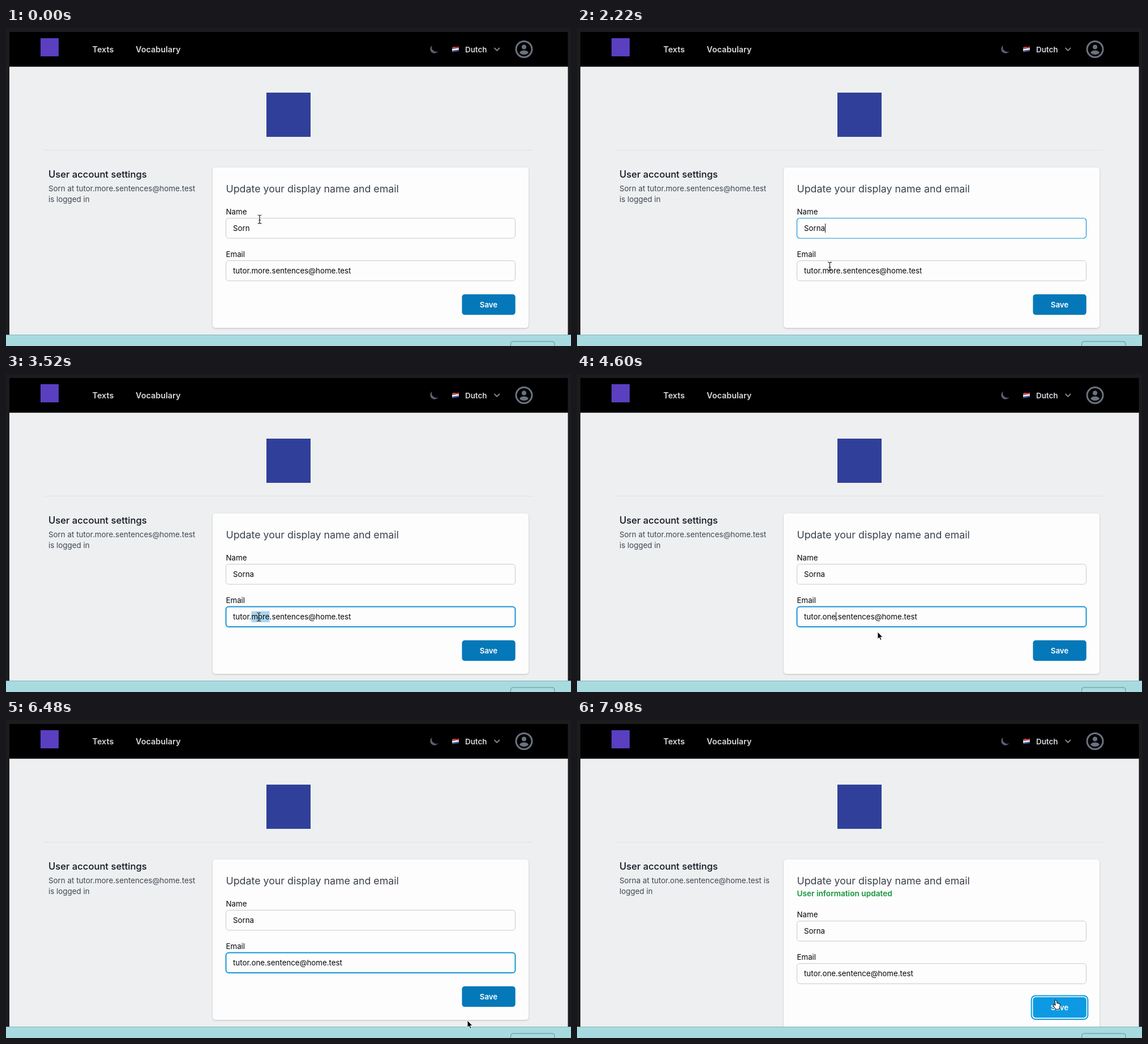
Write an HTML page that moves like this. It is 998 px wide and 561 px high and loops after 8000 ms.

```html
<!DOCTYPE html>
<html lang="en">
<head>
<meta charset="utf-8">
<title>Account settings</title>
<style>
  html, body { margin: 0; width: 100%; height: 100%; overflow: hidden; background: #edeff0; }
  svg { display: block; width: 998px; height: 561px; }
  text { font: 400 13.3px Inter, "Open Sans", sans-serif; fill: #06080c; white-space: pre; }
  .nav { font-size: 14.4px; font-weight: 600; fill: #d6d9de; }
  .lang { font-size: 13.4px; font-weight: 600; fill: #d6d9de; }
  .title { font-size: 16.6px; font-weight: 500; fill: #10151f; }
  .head { font-size: 17.8px; fill: #3a414c; }
  .para { font-size: 13.4px; fill: #3f4752; }
  .done { font-size: 13.65px; font-weight: 600; fill: #15963a; }
  .save { font-weight: 600; fill: #fff; text-anchor: middle; }
  .field { fill: #fdfdfd; stroke: #c6c9cf; }
  .shadow { filter: drop-shadow(0 1px 1.5px #0003); }
</style>
</head>
<body>
<svg viewBox="0 0 998 561">
  <rect width="998" height="561" fill="#1c1c1f"/>
  <rect x="6" y="68" width="986.500" height="474" fill="#edeff0"/>
  <rect x="6" y="7" width="986.500" height="61.300"/>

  <!-- top bar -->
  <rect x="61" y="18" width="32" height="32" fill="#5a3fc0"/>
  <text class="nav" x="152.500" y="43">Texts</text>
  <text class="nav" x="229" y="43">Vocabulary</text>
  <path d="M753 30.500a7.600 7.600 0 1 0 10.500 10.200a7.600 7.600 0 0 1-10.500-10.200z" fill="#596173"/>
  <path d="M788 34q3-1.500 6-.8t6-.7v3q-3 0-6 .8t-6 .7z" fill="#c8424a"/>
  <path d="M788 37q3 0 6-.7t6-.8v3q-3 0-6 .8t-6 .7z" fill="#f2f2f4"/>
  <path d="M788 40q3 0 6-.7t6-.8v2.500q-3 0-6 .8t-6 .7z" fill="#3657a5"/>
  <text class="lang" x="811" y="42.500">Dutch</text>
  <path d="M863 35.500l4.200 4.200 4.200-4.200" fill="none" stroke="#7d8491" stroke-width="2" stroke-linecap="round" stroke-linejoin="round"/>
  <g fill="#6b7280">
    <circle cx="915" cy="37.500" r="14" fill="none" stroke="#6b7280" stroke-width="3"/>
    <circle cx="915" cy="33.500" r="4"/>
    <path d="M907 43.500q2-4 8-4t8 4q-3 3.500-8 3.500t-8-3.500z"/>
  </g>

  <!-- page -->
  <rect x="460" y="114" width="78" height="78" fill="#30409a"/>
  <path d="M68 215.500H930" stroke="#dfe1e2"/>
  <text class="title" x="75" y="263.500">User account settings</text>
  <text class="para" x="75" y="288" id="who"></text>
  <text class="para" x="75" y="307" id="logged"></text>

  <rect id="card" class="shadow" x="365" y="246" width="558" height="283" rx="5" fill="#fdfdfd"/>
  <text class="head" x="388.500" y="289.500">Update your display name and email</text>
  <text class="done" x="388.500" y="311" id="done">User information updated</text>
  <g id="form">
    <text x="388.500" y="329">Name</text>
    <rect class="field" id="nameBox" x="388.500" y="335.500" width="511" height="35.500" rx="5"/>
    <text x="401" y="358" id="name"></text>
    <text x="388.500" y="404">Email</text>
    <rect class="field" id="emailBox" x="388.500" y="410.500" width="511" height="35.500" rx="5"/>
    <rect id="mark" y="418.500" height="19.500" fill="#a9d6ee"/>
    <text x="401" y="433" id="email"></text>
    <rect id="caret" width="1" height="16" fill="#111"/>
    <rect id="ring" x="802.700" y="467.300" width="99.600" height="41.400" rx="7" fill="#fff" stroke="#0d98dc" stroke-width="2"/>
    <rect id="save" x="805.400" y="469.800" width="94.300" height="36.300" rx="5"/>
    <text class="save" x="852.500" y="493">Save</text>
  </g>

  <!-- bottom strip -->
  <rect y="541" width="998" height="20" fill="#a8dbe0"/>
  <path d="M0 541.500H998" stroke="#83b3b9"/>
  <rect x="891.500" y="553" width="77.500" height="30" rx="4" fill="none" stroke="#628d93"/>

  <g id="pointer">
    <path id="beam" d="M-3.500-7.500q3 0 3.500 1.500q.5-1.500 3.500-1.500M0-6V6M-3.500 7.500q3 0 3.500-1.500q.5 1.500 3.500 1.500M-2 1.500H2" fill="none" stroke="#222" stroke-width="1.200"/>
    <path id="arrow" d="M0 0V12.500L2.900 9.900 4.900 14.500 7 13.600 5 9.200H9z" stroke="#fff" stroke-width=".9"/>
    <path id="hand" d="M-2-2q1.500-2 3 0l1 5 1-.8 1.500.6.7.5 1.500.5.8 1.400-.7 5-1.300 3H-.5L-4.800 7q-1.500-2.200.4-2.200L-1 6.300z" fill="#fff" stroke="#111" stroke-width="1.100" stroke-linejoin="round"/>
  </g>
</svg>
<script>
const $ = id => document.getElementById(id);
const LOOP = 8000, BLINK = 560, SHIFT = 19.2;
const SUBMIT = 7200, UPDATED = 7420;
const host = "@home.test";

// start time, focused field, name, local part of the email, caret index, selection start
const states = [
  [0, "", "Sorn", "tutor.more.sentences"],
  [1280, "name", "Sorn", "tutor.more.sentences", 4],
  [1760, "name", "Sorna", "tutor.more.sentences", 5],
  [2780, "email", "Sorna", "tutor.more.sentences", 8],
  [2960, "email", "Sorna", "tutor.more.sentences", 10, 6],
  [3720, "email", "Sorna", "tutor.o.sentences", 7],
  [3880, "email", "Sorna", "tutor.on.sentences", 8],
  [4060, "email", "Sorna", "tutor.one.sentences", 9],
  [5020, "email", "Sorna", "tutor.one.sentences", 19],
  [5400, "email", "Sorna", "tutor.one.sentence", 18],
  [SUBMIT, "", "Sorna", "tutor.one.sentence"]
];

// time, x, y of the pointer
const path = [
  [0, 448, 337.5], [100, 448, 337.5], [700, 448, 350], [1960, 448, 350],
  [2240, 446.5, 421.5], [2600, 446.5, 428.5], [4200, 446.5, 428.5],
  [4560, 531, 455], [4660, 531, 455], [4960, 527, 430], [5740, 527, 430],
  [6440, 815, 530], [6520, 815, 530], [6900, 846, 497], [LOOP, 846, 497]
];
const hiddenSpans = [[1760, 1960], [3720, 4200], [5400, 5740]];

function pointerAt(t) {
  const i = path.findIndex(p => p[0] > t);
  const [t0, x0, y0] = path[i - 1], [t1, x1, y1] = path[i];
  const u = (t - t0) / (t1 - t0), k = u * u * (3 - 2 * u);
  return [x0 + (x1 - x0) * k, y0 + (y1 - y0) * k];
}

const show = (id, on) => $(id).setAttribute("visibility", on ? "visible" : "hidden");
const inside = (x, y, l, t, r, b) => x >= l && x <= r && y >= t && y <= b;
const offset = (id, n) => 401 + (n ? $(id).getSubStringLength(0, n) : 0);

function setFocus(id, on, width) {
  $(id).style.stroke = on ? "#1597d4" : "";
  $(id).style.strokeWidth = on ? width : 1;
}

function draw(t) {
  const [since, field, name, local, at, from] = states.findLast(s => s[0] <= t);
  const updated = t >= UPDATED, dy = updated ? SHIFT : 0;

  $("name").textContent = name;
  $("email").textContent = local + host;
  $("who").textContent = updated
    ? "Sorna at tutor.one.sentence" + host + " is"
    : "Sorn at tutor.more.sentences" + host;
  $("logged").textContent = updated ? "logged in" : "is logged in";
  show("done", updated);
  $("form").setAttribute("transform", `translate(0 ${dy})`);
  $("card").setAttribute("height", 283 + dy);
  setFocus("nameBox", field === "name", 1.2);
  setFocus("emailBox", field === "email", 2);

  const selected = from !== undefined;
  show("mark", selected);
  if (selected) {
    const x = offset("email", from);
    $("mark").setAttribute("x", x);
    $("mark").setAttribute("width", offset("email", at) - x);
  }
  const blinkOn = (t - since) % (2 * BLINK) < BLINK && t > since;
  show("caret", field && !selected && blinkOn);
  if (field) {
    $("caret").setAttribute("x", offset(field, at));
    $("caret").setAttribute("y", field === "name" ? 345 : 420);
  }

  const [x, y] = pointerAt(t);
  const onSave = inside(x, y, 805, 470 + dy, 900, 506 + dy);
  const onField = [335, 410].some(top => inside(x, y, 388, top + dy, 900, top + 36 + dy));
  const visible = !hiddenSpans.some(([a, b]) => t >= a && t < b);
  $("pointer").setAttribute("transform", `translate(${x} ${y})`);
  show("beam", visible && onField);
  show("hand", visible && onSave);
  show("arrow", visible && !onField && !onSave);
  show("ring", t >= SUBMIT);
  $("save").setAttribute("fill", onSave ? "#0d9ae3" : "#0578b9");
}

const start = performance.now();
function tick() {
  draw((performance.now() - start) % LOOP);
  requestAnimationFrame(tick);
}
tick();
</script>
</body>
</html>
```
